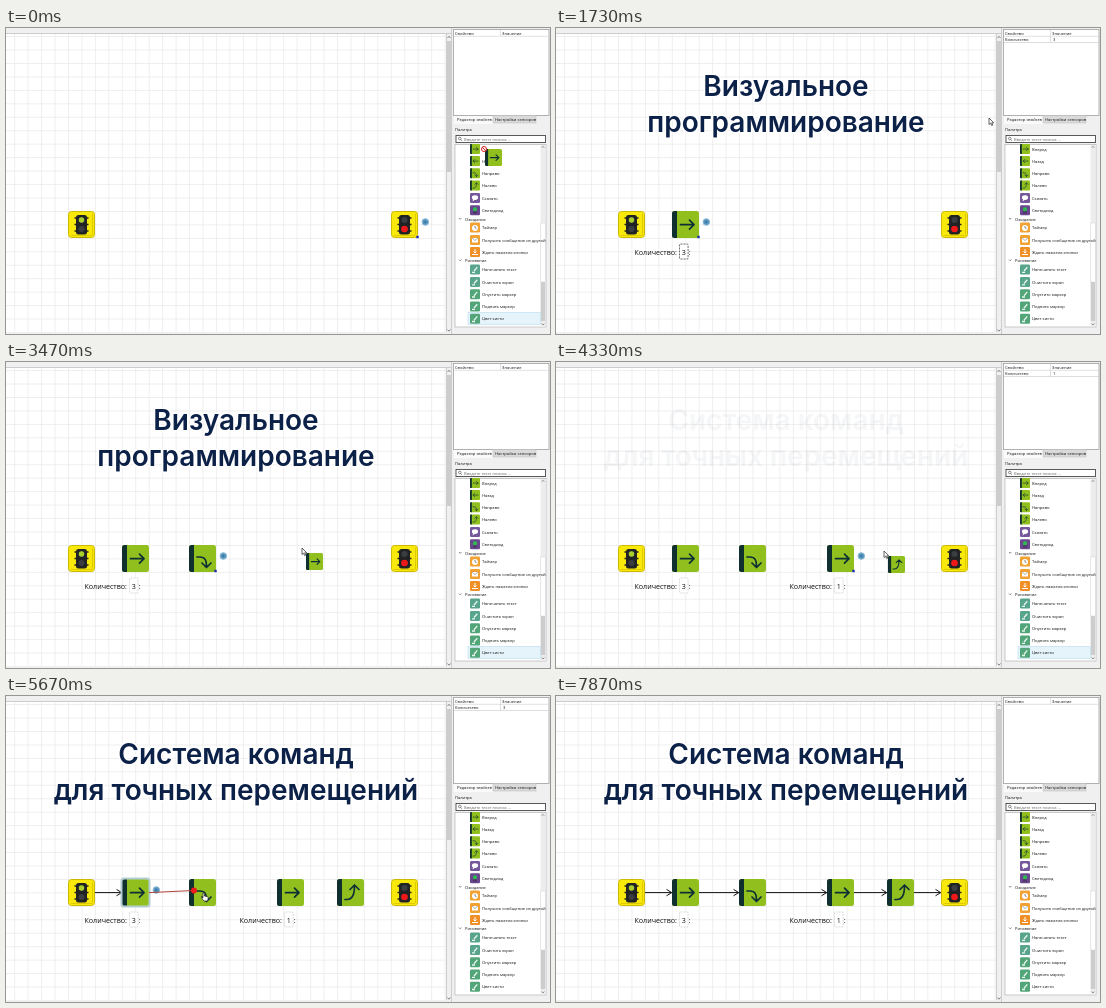
Recreate the animation shown at these times as an HTML page. Size 544 px wide and 306 px high, loop 8000 ms.

```html
<!DOCTYPE html>
<html lang="ru">
<head>
<meta charset="utf-8">
<title>Визуальное программирование</title>
<style>
  html, body { margin: 0; width: 100%; height: 100%; overflow: hidden; background: #fff; }
  svg { display: block; width: 544px; height: 306px; }
  text { font-family: "Open Sans", sans-serif; fill: #111; }
  .ui text { font-size: 4.1px; }
  .label text { font-size: 7.1px; }
  .title text {
    font: 600 28px Inter, sans-serif; fill: #0c2148; text-anchor: middle;
    stroke: #fff; stroke-width: 3px; stroke-linejoin: round; paint-order: stroke;
  }
  .sign { fill: none; stroke: #0d2f35; stroke-width: 1.7; stroke-linecap: round; stroke-linejoin: round; }
</style>
</head>
<body>
<svg viewBox="0 0 544 306">
  <defs>
    <pattern id="grid" x="8.2" y="8.1" width="13.45" height="13.45" patternUnits="userSpaceOnUse">
      <path d="M0 .4H13.45M.4 0V13.45" stroke="#e9e9e9" stroke-width=".8"/>
    </pattern>
    <g id="tile">
      <rect width="27" height="27" rx="2.5" fill="#91c01e"/>
      <path d="M5 0H2.5Q0 0 0 2.5V24.5Q0 27 2.5 27H5Z" fill="#10302f"/>
    </g>
    <g id="fwd"><use href="#tile"/><path class="sign" d="M8.5 13.7H22M17.5 9.2L22 13.7L17.5 18.2"/></g>
    <g id="back"><use href="#tile"/><path class="sign" d="M8.5 13.7H22M13 9.2L8.5 13.7L13 18.2"/></g>
    <g id="right"><use href="#tile"/><path class="sign" d="M8 12H11C16 12 17.5 15 17.5 22M13 18L17.5 22.5L22 18"/></g>
    <g id="left"><use href="#tile"/><path class="sign" d="M8 20.5H10C15.5 20.5 17.5 16 17.5 7M13 10.5L17.5 6L22 10.5"/></g>
    <g id="lamp">
      <rect x=".5" y=".5" width="26" height="26" rx="3" fill="#f8e90b" stroke="#cdb900"/>
      <path d="M3 24.5H24M24.5 3V24" stroke="#dfca00" fill="none"/>
      <path d="M6.5 7H20.500M6.500 13.500H20.500M6.500 20H20.500" stroke="#222" stroke-width="1.5"/>
      <rect x="8" y="4" width="11" height="19.500" rx="2.500" fill="#202224"/>
      <circle cx="13.500" cy="9" r="3" fill="#3b3e40"/>
      <circle cx="13.500" cy="18" r="3" fill="#3b3e40"/>
    </g>
    <g id="arrow"><path d="M0 0V6.500L1.600 5.200L2.700 7.600L3.700 7.100L2.700 4.800H4.700Z" fill="#fff" stroke="#222" stroke-width=".7"/></g>
    <g id="hand"><path d="M0 0Q1.200-.8 1.500.5V3L4.500 3.700Q5.400 4 5.200 5L4.600 8H1L-1.400 5Q-1.200 4 0 4.800Z" fill="#fff" stroke="#222" stroke-width=".7"/></g>
  </defs>

  <rect width="544" height="306" fill="#f0f0f0"/>
  <rect y="6" width="440" height="298" fill="#fff"/>
  <rect y="6" width="440" height="298" fill="url(#grid)"/>
  <path d="M0 5.500H445M440.500 6V304M445.500 0V306" stroke="#c4c4c4" stroke-width=".8"/>
  <rect x="441" y="13" width="4" height="131" fill="#cdcdcd"/>
  <path d="M441.500 10L443 8.300L444.500 10M441.500 301.500L443 303.200L444.500 301.500" fill="none" stroke="#555" stroke-width=".7"/>

  <g class="title" id="title1"><text x="230" y="68">Визуальное</text><text x="230" y="104">программирование</text></g>
  <g class="title" id="title2"><text x="230" y="68">Система команд</text><text x="230" y="104">для точных перемещений</text></g>

  <g class="ui">
    <rect x="447.500" y="1.500" width="95.500" height="86" fill="#fff" stroke="#a0a0a0" stroke-width=".8"/>
    <path d="M448 8.300H543M494.500 2V8" stroke="#d5d5d5" stroke-width=".7"/>
    <text x="449" y="6.500">Свойство</text><text x="496" y="6.500">Значение</text>
    <g id="prop">
      <path d="M448 14.500H543M494.500 8V14.500" stroke="#cfcfcf" stroke-width=".7"/>
      <text x="449" y="13">Количество</text><text x="497" y="13" id="value"></text>
    </g>
    <rect x="448" y="88" width="39" height="8" fill="#fafafa"/>
    <rect x="487" y="87.500" width="43" height="7.500" fill="#dadada" stroke="#bbb" stroke-width=".5"/>
    <text x="451" y="93.300">Редактор свойств</text><text x="489" y="92.800">Настройки сенсоров</text>
    <text x="449" y="102.500">Палитра</text>
    <rect x="450" y="107.400" width="89.500" height="7.200" fill="#fff" stroke="#333" stroke-width=".8"/>
    <circle cx="453.800" cy="110.500" r="1.300" fill="none" stroke="#444" stroke-width=".6"/>
    <path d="M454.700 111.500L456 112.900" stroke="#444" stroke-width=".6"/>
    <text x="458" y="112.500" style="fill:#666">Введите текст поиска ...</text>
    <rect x="449" y="116.500" width="91" height="182.500" fill="#fff" stroke="#b5b5b5" stroke-width=".7"/>
    <rect x="534.500" y="117" width="5" height="181.500" fill="#ededed"/>
    <rect x="534.800" y="195" width="4.400" height="59" fill="#fff" stroke="#d0d0d0" stroke-width=".5"/>
    <rect x="534.800" y="254" width="4.400" height="39" fill="#cdcdcd"/>
    <path d="M535.700 119.700L537 118.300L538.300 119.700M535.700 295.500L537 297L538.300 295.500" fill="none" stroke="#555" stroke-width=".6"/>
    <rect id="hover" x="462" y="284.500" width="72.500" height="12" fill="#e5f3fb" stroke="#b9dcee" stroke-width=".6"/>
    <g id="palette"></g>
  </g>

  <g id="links"></g>
  <g id="blocks">
    <use href="#lamp" x="62" y="183"/><circle cx="75.500" cy="192" r="2.700" fill="#a9cf2a"/>
    <use href="#lamp" x="385" y="183"/><circle cx="398.500" cy="201" r="3.300" fill="#f01818"/>
  </g>
  <g id="select">
    <rect id="glow" x="-.5" y="182.500" width="28" height="28" rx="2.500" fill="none" stroke="#b4cdd2" stroke-width="2"/>
    <rect id="handle" x="25.300" y="207.800" width="2.400" height="2.400" fill="#1b2bb0"/>
    <circle cx="34.300" cy="194" r="3.300" fill="#5795bd" stroke="#8fbcd8" stroke-width="1"/>
    <circle cx="34.300" cy="194" r="1.200" fill="#3b79a6"/>
  </g>
  <g id="rubber"><path stroke="#b0433c" stroke-width="1"/><circle r="3" fill="#ee1c1c"/></g>
  <use id="ghost"/>
  <g id="noDrop" fill="#fff" stroke="#d42020" stroke-width="1"><circle r="2.500"/><path d="M-1.700-1.700L1.700 1.700"/></g>
  <use id="cursor"/>
</svg>

<script>
const LOOP = 8000;
const $ = id => document.getElementById(id);
const show = (el, on) => el.style.display = on ? '' : 'none';

// Palette: [y, text, icon or colour]; rows without an icon are headings
const rows = [
  [121, 'Вперед', 'fwd'], [133, 'Назад', 'back'], [145.3, 'Направо', 'right'], [157.5, 'Налево', 'left'],
  [170, 'Сказать', '#75589b'], [182.300, 'Светодиод', '#69468e'], [191, 'Ожидание'],
  [199.600, 'Таймер', '#f2a232'], [212, 'Получить сообщение из другой', '#f2a232'], [224, 'Ждать нажатия кнопки', '#ef8f25'],
  [232.500, 'Рисование'], [241.500, 'Напечатать текст', '#58a48c'], [254, 'Очистить экран', '#58a48c'],
  [266.200, 'Опустить маркер', '#51a578'], [278.500, 'Поднять маркер', '#51a578'], [290.700, 'Цвет кисти', '#51a578']
];
const details = {
  'Сказать': '<ellipse cx="5" cy="4.600" rx="3.100" ry="2.300" fill="#fff"/><path d="M3 6L2.700 8.500L5 6.500" fill="#fff"/>',
  'Светодиод': '<rect x="3" y="2" width="4" height="4" rx="1.500" fill="#2dbb50"/><path d="M4 6V8.500M6 6V8.500" stroke="#222" stroke-width=".7"/>',
  'Таймер': '<circle cx="5" cy="5.300" r="3" fill="#fff"/><path d="M5 3.300V5.300L6.500 6" fill="none" stroke="#555" stroke-width=".7"/>',
  'Получить сообщение из другой': '<rect x="2" y="3" width="6" height="4.500" fill="#fff"/><path d="M2 3L5 5.500L8 3" fill="none" stroke="#777" stroke-width=".6"/>',
  'Ждать нажатия кнопки': '<path d="M2 7.500H8M5 2V6M3.500 4.500L5 6L6.500 4.500" fill="none" stroke="#fff"/>'
};
const pencil = '<path d="M2 7.800H5M4 6.500L7.300 2.700" stroke="#e9f5ee" stroke-width="1.300" fill="none"/>';

$('palette').innerHTML = rows.map(([y, text, icon]) => {
  if (!icon) return `<path d="M453 ${y - 1}L454.200 ${y + .3}L455.400 ${y - 1}" fill="none" stroke="#444" stroke-width=".6"/><text x="459" y="${y + 1.500}">${text}</text>`;
  const art = icon[0] === '#'
    ? `<rect width="10" height="10" rx="1.300" fill="${icon}"/>${details[text] || pencil}`
    : `<use href="#${icon}" transform="scale(.37)"/>`;
  return `<g transform="translate(464 ${y - 5})">${art}</g><text x="476" y="${y + 1.500}">${text}</text>`;
}).join('');

// Blocks: [x, icon, picked up, dropped, value x]
const blocks = [[116, 'fwd', 0, 700, 125.800], [183, 'right', 1960, 2600], [271, 'fwd', 3050, 3560, 280.800], [331, 'left', 3920, 4430]];
$('blocks').innerHTML += blocks.map(([x, icon, , , vx]) => `<g class="block"><use href="#${icon}" x="${x}" y="183"/>` +
  (vx ? `<g class="label"><text x="${vx - 47.300}" y="226.500">Количество:</text>
    <rect x="${vx - 2.300}" y="216" width="8.600" height="15" rx="1" fill="#fff" stroke="#ccc" stroke-width=".7" stroke-dasharray="2 1"/>
    <text x="${vx}" y="226.500">1</text><text x="${vx + 7}" y="226.500">:</text></g>` : '') + '</g>').join('');
const blockEls = document.querySelectorAll('.block');
const [countBox, count] = [blockEls[0].querySelector('rect'), blockEls[0].querySelectorAll('text')[1]];

// Links: [from, to, drag start, done]
const links = [[89, 116, 4800, 5180], [143, 183, 5380, 5720], [210, 271, 5970, 6270], [298, 331, 6440, 6720], [358, 385, 7010, 7320]];
$('links').innerHTML = links.map(([a, b]) =>
  `<path d="M${a} 196.600H${b}M${b - 5.500} 193.400L${b - .3} 196.600L${b - 5.500} 199.800" fill="none" stroke="#111" stroke-width="1"/>`).join('');

// Selection: [time, block x]
const picks = [[0, 385], [700, 116], [2600, 183], [3560, 271], [4430, 331], [4750, 62], [5250, 116], [5850, 183], [6330, 271], [6800, 331], [7450, null]];

// Pointer: [time, x, y]
const route = [
  [0, 475, 116], [120, 462, 122], [650, 114, 188], [720, 114, 188], [1000, 127, 223], [1480, 127, 223],
  [1730, 433, 90], [1920, 468, 144], [1980, 468, 144], [2530, 181, 188], [2650, 181, 188], [2980, 468, 120],
  [3060, 468, 120], [3470, 296, 186], [3560, 271, 188], [3620, 271, 188], [3880, 468, 157], [3940, 468, 157],
  [4330, 328, 189], [4480, 328, 188], [4720, 76, 196], [4800, 96, 194], [5150, 128, 197], [5250, 128, 197],
  [5380, 150, 194], [5660, 197, 197], [5880, 197, 197], [5970, 217, 194], [6240, 284, 197], [6340, 284, 197],
  [6440, 305, 194], [6700, 341, 196], [6930, 341, 196], [7010, 365, 194], [7300, 397, 197], [7500, 392, 190],
  [7780, 300, -12], [8000, 300, -12]
];

const clamp = v => Math.max(0, Math.min(1, v));
const ramp = (t, a, b) => { const u = clamp((t - a) / (b - a)); return u * u * (3 - 2 * u); };

function pointer(t) {
  const i = route.findIndex(p => p[0] > t);
  const [t0, x0, y0] = route[i - 1], [t1, x1, y1] = route[i];
  const u = ramp(t, t0, t1);
  return [x0 + (x1 - x0) * u, y0 + (y1 - y0) * u];
}

function render(t) {
  const [x, y] = pointer(t);
  const linking = t > 4700;

  $('title1').style.opacity = ramp(t, 450, 1000) * (1 - ramp(t, 3650, 4100));
  $('title2').style.opacity = ramp(t, 4270, 4800);

  blocks.forEach((b, i) => show(blockEls[i], t >= b[3]));
  const drag = blocks.find(b => t >= b[2] && t < b[3]);
  show($('ghost'), drag);
  show($('hover'), drag);
  show($('noDrop'), drag && x > 441);
  if (drag) {
    $('ghost').setAttribute('href', '#' + drag[1]);
    $('ghost').setAttribute('transform', `translate(${x + 4} ${y + 5}) scale(.63)`);
    $('noDrop').setAttribute('transform', `translate(${x + 3} ${y + 5})`);
  }

  const number = t < 1450 ? 1 : 3;
  const editing = t > 1000 && t < 1900;
  count.textContent = number;
  countBox.setAttribute('stroke', editing ? '#333' : '#ccc');

  const picked = picks.filter(p => p[0] <= t).pop()[1];
  show($('select'), picked !== null);
  $('select').setAttribute('transform', `translate(${picked || 0} 0)`);
  show($('glow'), linking);
  show($('handle'), !linking);
  show($('prop'), picked === 116 || picked === 271);
  $('value').textContent = picked === 116 ? number : 1;

  links.forEach((l, i) => show($('links').children[i], t >= l[3]));
  const link = links.find(l => t >= l[2] && t < l[3]);
  show($('rubber'), link);
  if (link) {
    const [line, dot] = $('rubber').children;
    const ex = Math.max(link[0] + 3, x - 9), ey = y - 2.500;
    line.setAttribute('d', `M${link[0]} 196.600L${ex} ${ey}`);
    dot.setAttribute('cx', ex);
    dot.setAttribute('cy', ey);
  }

  const overBlock = [62, 116, 183, 271, 331, 385].some(b => x >= b && x <= b + 27) && y > 183 && y < 210;
  $('cursor').setAttribute('href', linking && overBlock ? '#hand' : '#arrow');
  $('cursor').setAttribute('transform', `translate(${x} ${y})`);
  show($('cursor'), !(drag && x > 441));
}

let start;
function tick(now) {
  start ??= now;
  render((now - start) % LOOP);
  requestAnimationFrame(tick);
}
render(0);
requestAnimationFrame(tick);
</script>
</body>
</html>
```
